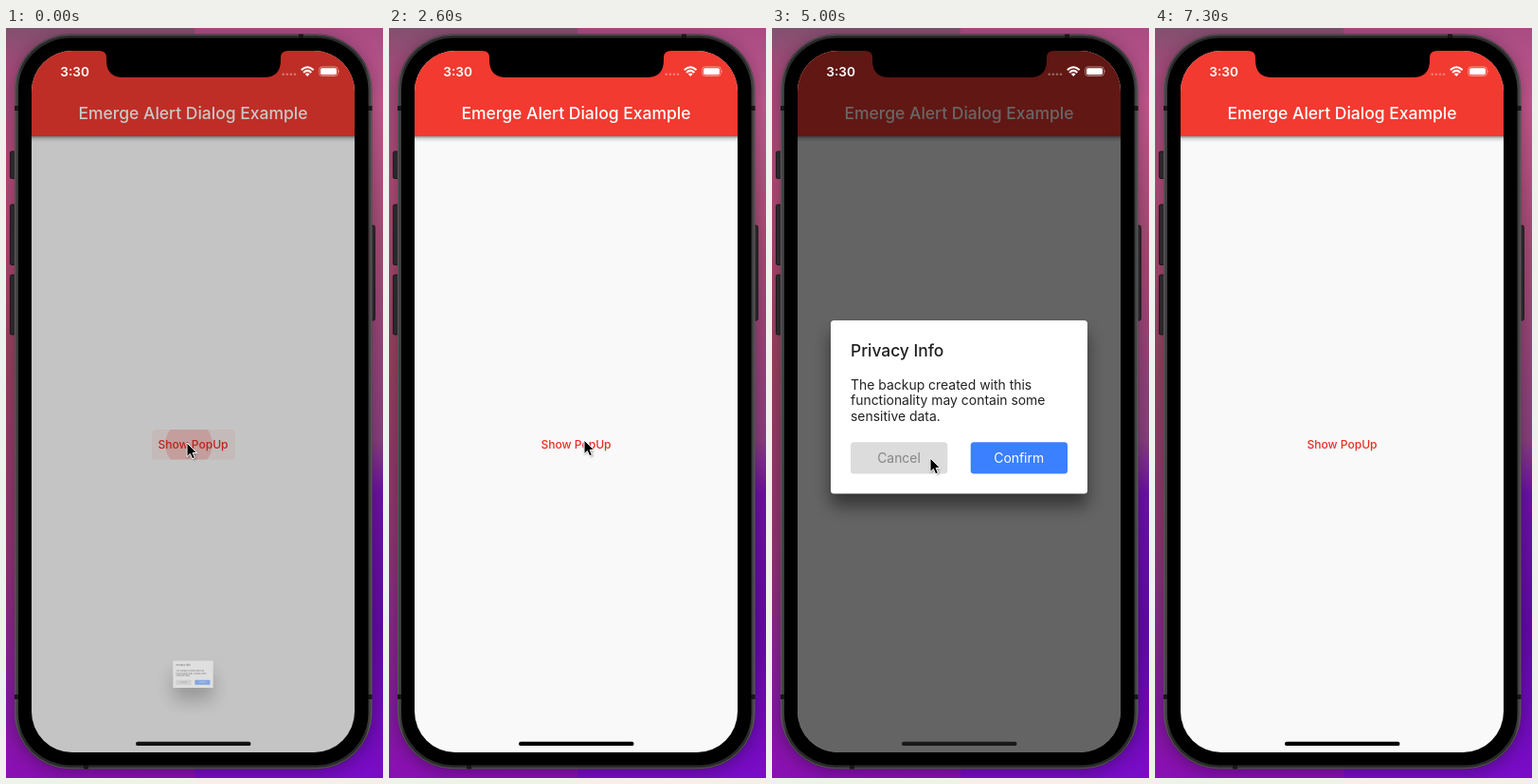
An HTML page that plays this animation: 398 by 790 pixels, repeating every 7900 ms.

```html
<!DOCTYPE html>
<html lang="en">
<head>
<meta charset="utf-8">
<title>Alert dialog demo</title>
<style>
  html, body { margin: 0; width: 100%; height: 100%; overflow: hidden; background: #8a4270; }
  svg { display: block; width: 398px; height: 790px; }
  text { font-family: Inter, Roboto, sans-serif; }
  .medium { font-weight: 500; }
</style>
</head>
<body>
<svg viewBox="0 0 398 790" xmlns="http://www.w3.org/2000/svg">
  <defs>
    <linearGradient id="wallLeft" x1="0" y1="0" x2="0" y2="1">
      <stop offset="0" stop-color="#82506f"/>
      <stop offset=".06" stop-color="#a84a7c"/>
      <stop offset=".2" stop-color="#b14a78"/>
      <stop offset=".45" stop-color="#97405f"/>
      <stop offset=".7" stop-color="#903374"/>
      <stop offset=".9" stop-color="#851ba0"/>
      <stop offset="1" stop-color="#8a0fb4"/>
    </linearGradient>
    <linearGradient id="wallRight" x1="0" y1="0" x2="0" y2="1">
      <stop offset="0" stop-color="#a84c83"/>
      <stop offset=".1" stop-color="#c2568c"/>
      <stop offset=".3" stop-color="#a04a72"/>
      <stop offset=".55" stop-color="#873f7c"/>
      <stop offset=".62" stop-color="#6a12a4"/>
      <stop offset=".8" stop-color="#600aa6"/>
      <stop offset="1" stop-color="#7a0cc8"/>
    </linearGradient>
    <linearGradient id="rim" x1="0" y1="0" x2="1" y2="0">
      <stop offset="0" stop-color="#4d4a4c"/>
      <stop offset=".02" stop-color="#2a2a2b"/>
      <stop offset=".98" stop-color="#2a2a2b"/>
      <stop offset="1" stop-color="#4d4a4c"/>
    </linearGradient>
    <linearGradient id="barShade" x1="0" y1="0" x2="0" y2="1">
      <stop offset="0" stop-color="#000" stop-opacity=".42"/>
      <stop offset=".4" stop-color="#000" stop-opacity=".15"/>
      <stop offset="1" stop-color="#000" stop-opacity="0"/>
    </linearGradient>
    <clipPath id="screen"><rect x="27" y="24" width="341" height="739" rx="43"/></clipPath>
    <clipPath id="button"><rect x="154" y="423" width="88" height="31.5" rx="3.5"/></clipPath>
    <filter id="blur" filterUnits="userSpaceOnUse" x="0" y="0" width="398" height="790">
      <feGaussianBlur stdDeviation="9"/>
    </filter>
    <filter id="halo" filterUnits="userSpaceOnUse" x="-40" y="-40" width="480" height="870">
      <feGaussianBlur stdDeviation="9"/>
    </filter>
    <filter id="soft" x="-50%" y="-50%" width="200%" height="200%">
      <feGaussianBlur stdDeviation="1"/>
    </filter>
  </defs>

  <rect width="200" height="790" fill="url(#wallLeft)"/>
  <rect x="199" width="199" height="790" fill="url(#wallRight)"/>
  <rect x="9" y="10" width="377" height="774" rx="58" opacity=".3" filter="url(#halo)"/>

  <g fill="#29282a" stroke="#121113" stroke-width=".8">
    <rect x="4.4" y="130" width="7" height="28.5" rx="1.5"/>
    <rect x="4.4" y="186" width="7" height="63.5" rx="1.5"/>
    <rect x="4.4" y="260" width="7" height="63" rx="1.5"/>
    <rect x="383" y="208" width="6.4" height="100" rx="1.5"/>
  </g>
  <rect x="9" y="6.5" width="377.5" height="774" rx="59" fill="url(#rim)"/>
  <rect x="9.7" y="7.2" width="376" height="772.6" rx="58" fill="none" stroke="#5b585a" stroke-width="1"/>
  <g fill="#171718">
    <rect x="9" y="82" width="5" height="5"/><rect x="381.5" y="82" width="5" height="5"/>
    <rect x="9" y="702" width="5" height="5"/><rect x="381.5" y="702" width="5" height="5"/>
    <rect x="82" y="776" width="5" height="4.5"/><rect x="309" y="6.5" width="5" height="4.5"/>
  </g>
  <rect x="13" y="10.5" width="369.5" height="766" rx="55"/>

  <g clip-path="url(#screen)">
    <rect x="27" y="24" width="341" height="739" fill="#f9f9f9"/>
    <rect x="27" y="114" width="341" height="6" fill="url(#barShade)"/>
    <rect x="27" y="24" width="341" height="90" fill="#f23a30"/>
    <text class="medium" x="197.5" y="96" font-size="17.5" text-anchor="middle" fill="#fff">Emerge Alert Dialog Example</text>
    <g id="press" clip-path="url(#button)">
      <rect x="154" y="423" width="88" height="32" fill="#f23a30" fill-opacity=".06"/>
      <circle id="ripple" fill="#f23a30" fill-opacity=".2"/>
    </g>
    <text class="medium" x="197.5" y="442.7" font-size="12.05" text-anchor="middle" fill="#f02c24">Show PopUp</text>
    <rect id="barrier" x="27" y="24" width="341" height="739"/>

    <g id="popup">
      <rect id="shadow" filter="url(#blur)" fill-opacity=".48"/>
      <g id="dialog">
        <rect x="62" y="308" width="271" height="182.5" rx="3.5" fill="#fff"/>
        <text class="medium" x="83" y="345.5" font-size="17.4" fill="#1f1f1f">Privacy Info</text>
        <g font-size="13.95" fill="#222">
          <text x="83" y="380.7">The backup created with this</text>
          <text x="83" y="397.2">functionality may contain some</text>
          <text x="83" y="413.7">sensitive data.</text>
        </g>
        <rect x="83" y="436.3" width="102.3" height="33.2" rx="3.5" fill="#dcdcdc"/>
        <rect x="209.7" y="436.3" width="102.3" height="33.2" rx="3.5" fill="#3a80ff"/>
        <g font-size="13.9" text-anchor="middle">
          <text x="134" y="458" fill="#858585">Cancel</text>
          <text x="260.7" y="458" fill="#fff">Confirm</text>
        </g>
      </g>
    </g>

    <path d="M98 23H298V24Q290 24 290 31V34Q290 52 272 52H124Q106 52 106 34V31Q106 24 98 24Z"/>
    <g fill="#fff">
      <text x="57.3" y="50.7" font-size="13.6" font-weight="600">3:30</text>
      <g opacity=".35">
        <circle cx="292.7" cy="48.7" r="1.3"/><circle cx="296.8" cy="48.7" r="1.3"/>
        <circle cx="300.9" cy="48.7" r="1.3"/><circle cx="305" cy="48.7" r="1.3"/>
      </g>
      <g fill="none" stroke="#fff" stroke-width="2.1">
        <path d="M311.8 44.3Q318.2 38.2 324.6 44.3"/>
        <path d="M314.1 46.9Q318.2 43 322.3 46.9"/>
      </g>
      <path d="M315.8 48.5Q318.2 46.4 320.6 48.5L318.2 51Z"/>
      <rect x="330.7" y="40.9" width="19.6" height="9.6" rx="2.8" fill="none" stroke="#fff" stroke-opacity=".5" stroke-width=".9"/>
      <rect x="332" y="42.2" width="17" height="7" rx="1.6"/>
      <path d="M351.2 44.2Q352.7 45.7 351.2 47.2Z" opacity=".6"/>
    </g>
    <rect id="home" x="137" y="751.7" width="121.5" height="4.4" rx="2.2"/>
  </g>

  <g id="cursor">
    <path d="M0 1V16L4 13L7 18L10 17L7.5 12H11Z" opacity=".35" filter="url(#soft)"/>
    <path d="M0 0V14.6L3.4 11.5L5.7 16.8L8.4 15.6L6.1 10.5H10.6Z" stroke="#fff" stroke-width="1" stroke-linejoin="round"/>
  </g>
</svg>
<script>
  const LOOP = 7900, STEP = 100, EMERGE = 400;
  const $ = id => document.getElementById(id);
  const set = (id, attrs) => {
    for (const k in attrs) $(id).setAttribute(k, attrs[k]);
  };
  const clamp = v => Math.max(0, Math.min(1, v));
  const smooth = v => v * v * (3 - 2 * v);

  // opening and closing start times
  const visits = [[-100, 550], [1350, 1950], [2700, 3350], [4150, 5020], [5650, 6750]];

  // time, x, y of the pointer tip
  const path = [
    [0, 191, 437], [300, 160, 456], [1100, 159, 456], [1300, 203, 436],
    [1450, 203, 436], [1800, 166, 456], [2300, 166, 456], [2600, 206, 434],
    [2800, 204, 436], [3200, 167, 457], [3900, 167, 457], [4100, 200, 437],
    [4250, 200, 437], [4600, 167, 453], [5200, 167, 453], [5550, 198, 437],
    [5750, 198, 437], [6100, 167, 464], [7900, 167, 464]
  ];

  function pointer(t) {
    const i = Math.max(1, path.findIndex(p => p[0] > t));
    const [t0, x0, y0] = path[i - 1], [t1, x1, y1] = path[i];
    const k = smooth((t - t0) / (t1 - t0));
    return [x0 + (x1 - x0) * k, y0 + (y1 - y0) * k];
  }

  function drawPopup(p) {
    const s = smooth(p), fade = 1 - Math.pow(1 - p, 1.55);
    const cx = 197.5, base = 733;
    set('barrier', { opacity: 0.595 * fade });
    set('home', { opacity: 1 - 0.25 * fade });
    set('popup', { opacity: Math.min(1, fade * 1.3), display: p > 0 ? 'inline' : 'none' });
    set('dialog', { transform: `translate(${cx} ${base}) scale(${s}) translate(${-cx} ${-base})` });
    set('shadow', {
      x: cx - 135.5 * s, y: base - 425 * s + 13,
      width: 271 * s, height: 182.5 * s, rx: 3
    });
  }

  function drawRipple(t) {
    const hit = visits.find(v => t >= v[0] && t < v[0] + 350);
    set('press', { display: hit ? 'inline' : 'none' });
    if (!hit) return;
    const age = t - hit[0], [x, y] = pointer(Math.max(0, hit[0]));
    set('ripple', { cx: x + 2, cy: y + 1.5, r: 10 + age * 0.15 });
    set('press', { opacity: 1 - clamp((age - 120) / 230) });
  }

  function draw(t) {
    const p = Math.max(...visits.map(([a, b]) =>
      Math.min(clamp((t - a) / EMERGE), 1 - clamp((t - b) / EMERGE))));
    drawPopup(p);
    drawRipple(t);
    set('cursor', {
      transform: `translate(${pointer(t)})`,
      display: t < 7300 ? 'inline' : 'none'
    });
  }

  const start = performance.now();
  function tick() {
    const t = (performance.now() - start) % LOOP;
    draw(Math.floor(t / STEP) * STEP);
    requestAnimationFrame(tick);
  }
  tick();
</script>
</body>
</html>
```
